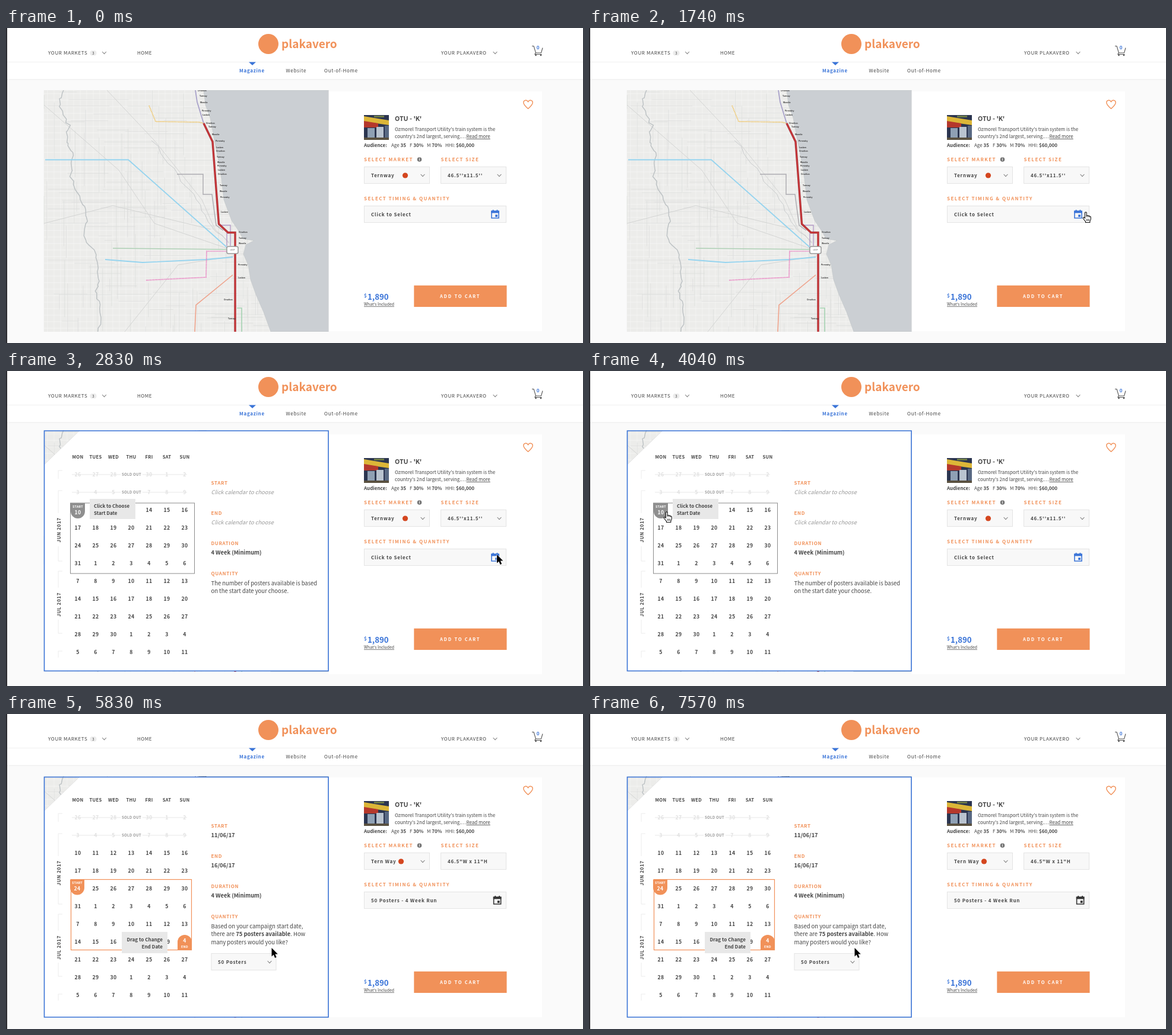
These frames come from a looping animation (972x532 px, 7620 ms). An HTML page:

```html
<!DOCTYPE html>
<html lang="en">
<head>
<meta charset="utf-8">
<title>Campaign booking</title>
<style>
  html, body { margin: 0; width: 100%; height: 100%; overflow: hidden; background: #fafafa; }
  svg { display: block; }
  text { font-family: "Noto Sans CJK SC", "Noto Sans CJK JP", "Noto Sans", sans-serif; white-space: pre; }
</style>
</head>
<body>
<svg id="stage" width="972" height="532" viewBox="0 0 972 532"></svg>
<script>
const LOOP = 7620, OPEN = 1960, PICK = 4250;
const ORANGE = '#f19159', BLUE = '#3a74d8', DARK = '#444';
const BOLD = 'font-weight="700" ', MID = 'text-anchor="middle" ';

const text = (x, y, size, str, attrs = '', fill = DARK, gap = 0) =>
  `<text x="${x}" y="${y}" font-size="${size}" fill="${fill}" letter-spacing="${gap}" ${attrs}>${str}</text>`;
const bold = (x, y, size, str, fill, gap, attrs = '') => text(x, y, size, str, BOLD + attrs, fill, gap);
const rect = (x, y, w, h, fill, attrs = '') =>
  `<rect x="${x}" y="${y}" width="${w}" height="${h}" fill="${fill}" ${attrs}/>`;
const path = (d, stroke, width = 1, fill = 'none', attrs = '') =>
  `<path d="${d}" fill="${fill}" stroke="${stroke}" stroke-width="${width}" ${attrs}/>`;
const circle = (x, y, r, fill) => `<circle cx="${x}" cy="${y}" r="${r}" fill="${fill}"/>`;
const chevron = (x, y) => path(`M${x - 3.4} ${y - 2}l3.4 3.7l3.4 -3.7`, '#858585', 1.1);
const field = (x, y, w, h = 29) => rect(x + .5, y + .5, w - 1, h - 1, '#f8f8f8', 'stroke="#e4e4e4"');
const heading = (x, y, str) => bold(x, y, 8, str, ORANGE, 1.45);
const value = (x, y, str) => bold(x, y, 8, str, DARK, .82);
const group = (id, body, attrs = '') => `<g id="${id}" ${attrs}>${body}</g>`;

let seed = 11;
const rand = () => (seed = seed * 16807 % 2147483647) / 2147483647;

function header() {
  return rect(0, 0, 972, 87, '#fff') + rect(0, 57, 972, 1, '#f1f1f1') + rect(0, 86.5, 972, 1, '#ececec')
    + text(71, 45, 8, 'YOUR MARKETS', '', DARK, .68) + rect(141.5, 38, 11, 8.5, '#ececec', 'rx="4"')
    + text(147, 44.5, 6, '3', MID) + chevron(165.5, 42)
    + text(221, 45, 8, 'HOME', '', DARK, .5)
    + circle(442, 27, 17, ORANGE) + bold(464, 34, 19, 'plakavero', ORANGE, 0)
    + text(733, 45, 8, 'YOUR PLAKAVERO', '', DARK, .68) + chevron(824, 42)
    + path('M886 30.5h3l3.5 11.5h9l2.5 -8.5M892 42l-1 2.5h11.5', '#555', 1.1)
    + circle(892.5, 46, 1.3, '#555') + circle(901, 46, 1.3, '#555') + rect(892.5, 28, 7.5, 10, '#fff')
    + bold(896, 35.8, 8, '0', BLUE, 0, MID)
    + path('M409 57.5h12l-6 5.5z', 'none', 0, BLUE)
    + bold(393, 75, 8, 'Magazine', BLUE, .7)
    + text(471.5, 75, 8, 'Website', '', DARK, .72) + text(536, 75, 8, 'Out-of-Home', '', DARK, .72);
}

function photo() {
  return rect(603, 147, 42, 42, '#2b3550') + path('M603 149L645 156V164L603 158Z', 'none', 0, '#dcb638')
    + path('M603 157L627 161V168L603 168Z', 'none', 0, '#b5382c') + rect(609, 169, 12, 16, '#8fa0b4')
    + rect(624, 167, 12, 18, '#b9c3cf') + rect(638, 165, 7, 20, '#596983')
    + rect(620, 148, 17, 3, '#6d7b49') + rect(603, 185, 42, 4, '#5a5140');
}

function card() {
  return rect(543, 107, 360, 405, '#fff')
    + path('M879.5 136.3C874 131.5 871.8 129 871.8 126C871.8 121.5 877.3 120.5 879.5 124.6C881.7 120.5 887.2 121.5 887.2 126C887.2 129 885 131.5 879.5 136.3Z', ORANGE, 1.4)
    + photo() + bold(655, 157, 10.7, "OTU - 'K'", DARK, 0)
    + text(655, 174, 8, "Ozmorel Transport Utility's train system is the")
    + text(655, 186, 8, "country's 2nd largest, serving.…")
    + text(775.5, 186, 8, 'Read more', 'text-decoration="underline"')
    + bold(603, 201, 8, 'Audience:', DARK, 0)
    + [[649, 'Age', '35'], [680, 'F', '30%'], [709, 'M', '70%'], [740, 'HHI:', '$60,000']].map(([x, k, v]) =>
        text(x, 201, 8, `${k} <tspan ${BOLD}>${v}</tspan>`)).join('')
    + heading(603, 225, 'SELECT MARKET') + circle(696.5, 222, 3.8, '#777') + bold(696.5, 224.3, 6, 'i', '#fff', 0, MID)
    + heading(732.5, 225, 'SELECT SIZE') + heading(603, 291, 'SELECT TIMING &amp; QUANTITY')
    + field(603, 234, 111) + chevron(702, 249) + field(732, 234, 111) + field(603, 300, 240)
    + bold(603, 455, 8, '$', BLUE, 0) + bold(609, 459, 13.3, '1,890', BLUE, 0)
    + text(603, 469, 6.85, "What's Included", 'text-decoration="underline"')
    + rect(687.3, 434.8, 156.2, 36.2, ORANGE) + bold(731, 456, 7.5, 'ADD TO CART', '#fff', 1.8);
}

const dateIcon = (x, color) => path(`M${x + .8} 309.5h12v11.5h-12z`, color, 1.6)
  + rect(x, 308.5, 13.6, 4, color) + rect(x + 2.5, 307, 1.8, 3, color) + rect(x + 9.3, 307, 1.8, 3, color)
  + rect(x + 7, 315.3, 3.8, 3.8, color);

const choice = (market, dotX, size, timing, iconX, color) =>
  value(615, 252, market) + circle(dotX, 249, 4.6, '#d4461f') + value(744, 252, size)
  + value(615, 318, timing) + dateIcon(iconX, color);

// A meandering line through the given points.
function winding(points, sway) {
  let d = 'M' + points[0];
  points.slice(1).forEach(([x, y], i) => {
    const [px, py] = points[i];
    for (let k = 1; k <= 5; k++)
      d += `L${(px + (x - px) * k / 5 + (rand() - .5) * sway).toFixed(1)} ${(py + (y - py) * k / 5 + (rand() - .5) * sway).toFixed(1)}`;
  });
  return d;
}

function streets() {
  let white = '', grey = '';
  for (let x = 70; x < 450; x += 11) white += `M${x} 105V513`;
  for (let y = 111; y < 513; y += 11) white += `M64 ${y}H450`;
  for (let i = 0; i < 170; i++)
    grey += `M${64 + rand() * 360} ${105 + rand() * 400}${i % 2 ? 'h' : 'v'}${20 + rand() * 90}`;
  return path(white, '#f5f5f4', .8) + path(grey, '#dcdddb', .7);
}

function map() {
  const river = [[97, 105], [90, 132], [106, 166], [101, 192], [113, 216], [108, 250], [126, 290],
    [136, 322], [129, 350], [150, 380], [157, 420], [151, 450], [161, 480], [155, 513]];
  let out = rect(63.5, 105, 480, 408, '#ececea') + streets()
    + path('M64 130L190 240L250 330L372 372M170 105L250 190L330 290L352 340L376 362M64 330L180 300L345 340M200 513L290 400L384 385', '#d3d4d3', 1)
    + path(winding(river, 6), '#bec3c5', 1.5, 'none', 'stroke-linejoin="round"')
    + path(winding([[245, 190], [290, 250], [322, 290], [346, 335], [374, 362]], 5), '#c9cccd', 1)
    + path('M333 105L336 130L344 152L351 190L358 225L363 255L367 290L380 325L394 346L399 356L418 359L404 366L400 382L408 400L412 425L421 450L434 480L446 513H543.5V105Z', '#bfc4c7', .6, '#cbcfd3');
  const red = 'M333 161L348 192L358.5 331L374 345.5H386V513';
  const lines = [
    ['M319 105L322 125L333 161', '#a9a2ca', 1.8], ['M241 131L252 158L325 159L333 161', '#f2c560', 1.7, '1.5 1'],
    ['M66 222.5H206L375 373', '#96d4ef', 1.8], ['M167 391L230 396L337 391L382 387', '#96d4ef', 1.8],
    ['M180 372L375 374', '#aed0b5', 1.6], ['M288 247H332V281H347L354 333L366 342', '#aeadb2', 1.5],
    ['M236 426L337 421L338 377H373', '#ea74bd', 1.7, '1.5 1'], ['M382 417L320 468L318 513', '#efa38c', 1.6],
    ['M360 333H378V368M372 346V368', '#b49bc6', 1.4], ['M389 473H397V513', '#a5d3b2', 1.6],
    [red, '#a83238', 3.4], [red, '#d0383a', 1.5]
  ];
  out += lines.map(([d, c, w, dash]) => path(d, c, w, 'none', dash ? `stroke-dasharray="${dash}"` : '')).join('');
  const stops = [[323, 107], [326, 116], [327, 127], [330, 141], [331, 148], [337, 162], [341, 168], [347, 181],
    [353, 192], [354, 203], [354, 209], [355, 219], [356, 228], [356, 234], [357, 241], [357, 248], [360, 267],
    [360, 277], [361, 287], [362, 312], [392, 346], [392, 356], [392, 365], [391, 401], [391, 423], [367, 460], [374, 492]];
  const names = ['Orvelton', 'Tamsay', 'Wendle', 'Pirrowby', 'Lusken'];
  out += stops.map(([x, y], i) => bold(x, y, 3.4, names[i % 5], '#333', 0)).join('');
  return out + rect(372, 369, 19, 12, '#fff', 'rx="2.5" stroke="#999" stroke-width="1.5"') + bold(381.5, 376, 3, 'LOOP', '#888', 0, MID);
}

// The page has its top left corner folded away, showing the map beneath.
const page = top => path(`M124 ${top}H543V${top + 406}H65V${top + 57}Z`, 'none', 0, '#fff')
  + path(`M124 ${top}L65 ${top + 57}`, '#e3e3e3', 1)
  + path(`M64.5 ${top + .5}H543V${top + 406}H64.5Z`, BLUE, 1.6);

const dayX = col => 121 + 30 * col, dayY = row => 177.5 + 30 * row;
const dayOf = i => i < 5 ? i + 26 : i < 36 ? i - 4 : (i - 36) % 30 + 1;

function days() {
  let out = ['MON', 'TUES', 'WED', 'THU', 'FRI', 'SAT', 'SUN'].map((d, i) =>
    bold(dayX(i), 147.5, 7.6, d, DARK, .25, MID)).join('');
  for (let i = 0; i < 77; i++)
    out += bold(dayX(i % 7), dayY(i / 7 | 0), 8.7, dayOf(i), i < 14 ? '#e0e0e0' : DARK, .3, MID);
  for (const y of [174.5, 204.5])
    out += rect(111, y, 194, .8, '#e2e2e2') + rect(193, y - 5, 37, 10, '#fff') + bold(211.5, y + 2.8, 6.2, 'SOLD OUT', '#999', .2, MID);
  for (const [y, label] of [[268.5, 'JUN 2017'], [394.5, 'JUL 2017']])
    out += bold(0, 0, 8, label, DARK, .65, `${MID}transform="translate(91.5 ${y}) rotate(-90)"`);
  return out + path('M95 168H88V182M95 202H88V240M88 296V321H95M95 338H88V366M88 420V443H95M95 473H88V484', '#ececec');
}

const badge = (x, y, color, label, day, flip) =>
  path(flip ? `M${x} ${y + 26}V${y + 12}a12 12 0 0 1 24 0V${y + 26}Z` : `M${x} ${y}H${x + 24}V${y + 14}a12 12 0 0 1 -24 0Z`, 'none', 0, color)
  + bold(x + 12, y + (flip ? 21.5 : 7.5), 5.4, label, '#fff', .2, MID) + bold(x + 12, y + (flip ? 13 : 18.5), 8.7, day, '#fff', .3, MID);

const detail = (y, label, str, attrs, fill) => bold(345.5, y, 8, label, ORANGE, .65) + text(345.5, y + 15.5, 9.3, str, attrs, fill);
const para = rows => rows.map((r, i) => text(345.5, 361.5 + 13.6 * i, 9.45, r)).join('');

function choosing() {
  const hint = ['Click calendar to choose', 'font-style="italic"', '#999'];
  return page(100.5) + days() + rect(108.5, 223, 209, 119, 'none', 'stroke="#8c8c8c"')
    + badge(109, 223, '#8f8f8f', 'START', 10)
    + rect(141, 216, 77, 34, '#e8e8e8') + bold(148, 230.5, 8, 'Click to Choose', DARK, 0) + bold(148, 242.5, 8, 'Start Date', DARK, 0)
    + detail(192, 'START', ...hint) + detail(243, 'END', ...hint)
    + detail(294, 'DURATION', '4 Week (Minimum)', BOLD) + detail(345, 'QUANTITY', '')
    + para(['The number of posters available is based', 'on the start date your choose.']);
}

function chosen() {
  const end = BOLD + 'text-anchor="end" ';
  return page(106) + days() + rect(109.5, 279.5, 203, 119, 'none', `stroke="${ORANGE}" stroke-width="1.2"`)
    + badge(108, 279.5, ORANGE, 'START', 24) + badge(289, 373, ORANGE, 'END', 4, true)
    + rect(195, 368, 77, 36, '#e8e8e8') + text(264, 383.5, 8.1, 'Drag to Change', end) + text(264, 395.5, 8.1, 'End Date', end)
    + detail(192, 'START', '11/06/17', BOLD) + detail(243, 'END', '16/06/17', BOLD)
    + detail(294, 'DURATION', '4 Week (Minimum)', BOLD) + detail(345, 'QUANTITY', '')
    + para(['Based on your campaign start date,', `there are <tspan ${BOLD}>75 posters available</tspan>. How`, 'many posters would you like?'])
    + field(345.5, 404, 110) + value(357, 422, '50 Posters') + chevron(444, 419);
}

const arrow = path('M0 0V14.6L3.3 11.5L5.6 16.9L8.1 15.8L5.8 10.6H10.3Z', '#fff', 1, '#000', 'paint-order="stroke"');
const hand = path('M-1.6 1.2C-1.6 -.4 1.2 -.4 1.2 1.2V6Q2.6 5 3.8 6.4Q5.2 5.5 6.3 7.1Q8.3 6.6 8.3 9V12L6.8 15.5V17.5H-.5V16L-4.6 10.8C-5.6 9 -3.6 8 -1.6 10.2Z', '#111', 1.1, '#fff')
  + path('M1.3 11.5V15M3.3 11.5V15M5.3 11.5V15M1.2 6V8.5M3.8 6.5V8.7M6.3 7.2V9', '#111', .8);

const stage = document.getElementById('stage');
stage.innerHTML = `<clipPath id="panel">${rect(63.5, 105, 480, 408, '#000')}</clipPath>`
  + rect(0, 0, 972, 532, '#fafafa') + header() + card()
  + group('map', map(), 'clip-path="url(#panel)"') + group('choosing', choosing()) + group('chosen', chosen())
  + group('before', choice('Ternway', 672.5, "46.5''x11.5''", 'Click to Select', 817.2, BLUE) + chevron(831, 249))
  + group('after', choice('Tern Way', 665.5, '46.5"W x 11"H', '50 Posters - 4 Week Run', 820.8, '#333'))
  + rect(0, 0, 2, 532, '#2e2e33')
  + group('cursor', group('arrow', arrow) + group('hand', hand));

const part = id => document.getElementById(id);
const show = (id, on) => part(id).setAttribute('display', on ? 'inline' : 'none');

// Each move: start time, end time, from, to, sideways bend in y.
const moves = [
  [620, 1520, [650, 536], [837, 311], 0],
  [2750, 3900, [837, 311], [131, 238], 0],
  [4520, 5760, [131, 238], [447.5, 395], 14]
];
function cursorAt(t) {
  const [start, end, a, b, bend] = moves.filter(m => t >= m[0]).pop() || moves[0];
  const u = Math.min(1, Math.max(0, (t - start) / (end - start)));
  const e = u * u * (3 - 2 * u);
  return [a[0] + (b[0] - a[0]) * e, a[1] + (b[1] - a[1]) * e + bend * 4 * e * (1 - e)];
}

const begin = performance.now();
function draw() {
  const t = (performance.now() - begin) % LOOP;
  const open = t >= OPEN, picked = t >= PICK;
  show('choosing', open && !picked);
  show('chosen', picked);
  show('before', !picked);
  show('after', picked);
  // The map rides up with the page while choosing; only the folded corner shows it then.
  part('map').setAttribute('transform', `translate(0 ${open && !picked ? -5 : 0})`);
  const [x, y] = cursorAt(t);
  const pointing = t > 1400 && t < OPEN || t > 3800 && t < PICK;
  show('cursor', t >= moves[0][0]);
  show('arrow', !pointing);
  show('hand', pointing);
  part('cursor').setAttribute('transform', `translate(${x.toFixed(1)} ${y.toFixed(1)})`);
  requestAnimationFrame(draw);
}
draw();
</script>
</body>
</html>
```
